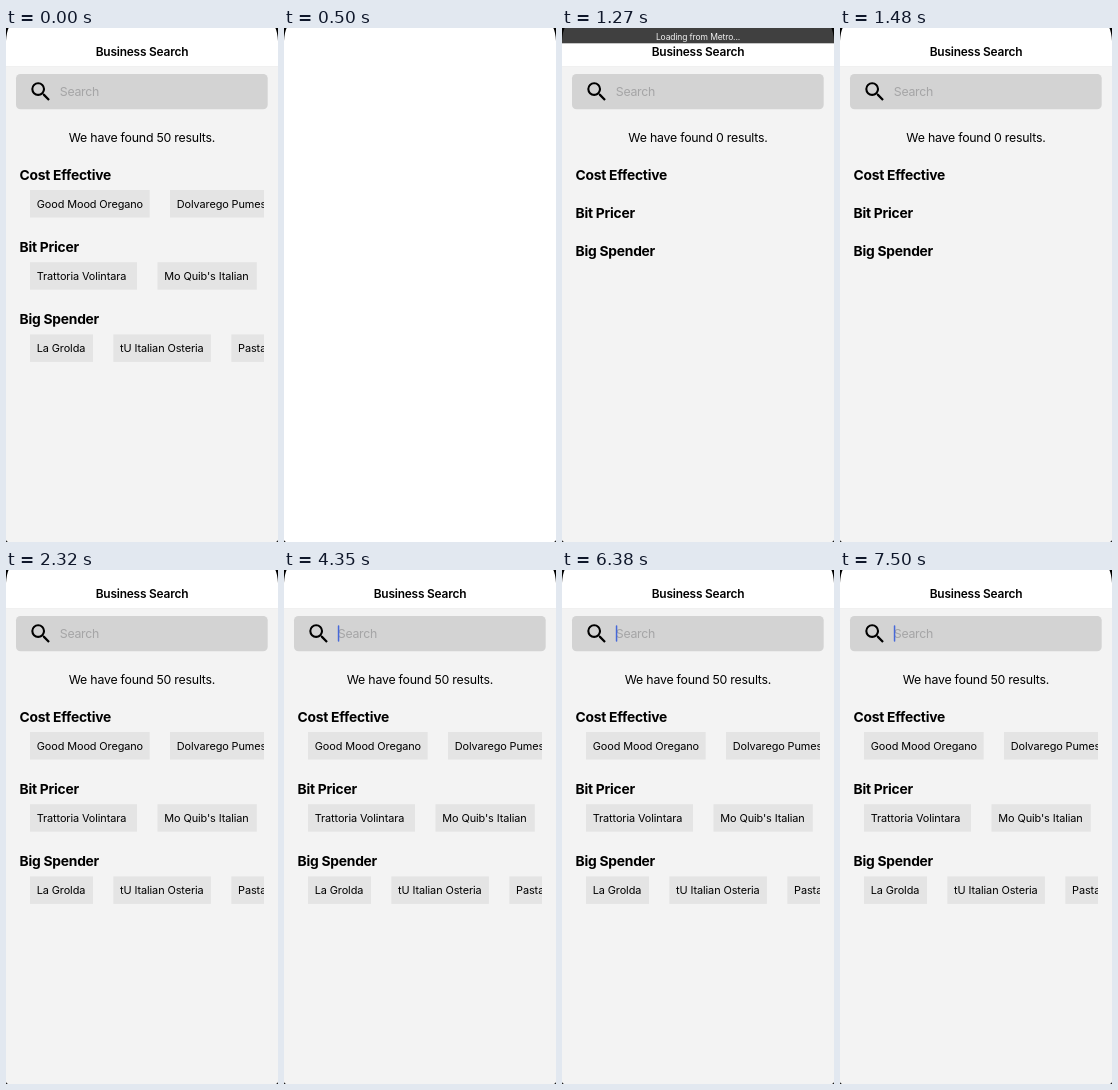
An HTML page that plays this animation: 272x514 px, repeating every 8 s.

```html
<!DOCTYPE html>
<html lang="en">
<head>
<meta charset="utf-8">
<title>Business Search</title>
<style>
  html, body { margin: 0; width: 100%; height: 100%; overflow: hidden; background: #000; }
  svg { display: block; width: 272px; height: 514px; }
  text { font: 400 12.33px Inter, "Open Sans", sans-serif; letter-spacing: -.22px; fill: #000; }
  .mid { text-anchor: middle; }
  .title { font-weight: 600; font-size: 11.9px; letter-spacing: -.2px; }
  .heading { font-weight: 700; font-size: 13.8px; letter-spacing: -.22px; }
  .chip { font-size: 10.9px; letter-spacing: -.1px; }
  .hint { letter-spacing: -.3px; fill: #a5a5a6; }
  .notice { font-size: 8.5px; letter-spacing: -.12px; fill: #f0f0f0; }
</style>
</head>
<body>
<svg viewBox="0 0 272 514">
  <defs>
    <clipPath id="rows"><rect x="13" y="100" width="245" height="260"/></clipPath>
  </defs>
  <rect width="272" height="514" fill="#fff"/>
  <g id="page">
    <rect y="39" width="272" height="475" fill="#f3f3f3"/>
    <rect y="38.6" width="272" height=".4" fill="#d8d8d8"/>
    <text class="mid title" x="136" y="27.9">Business Search</text>
    <rect x="10" y="46" width="251.7" height="35.2" rx="4.5" fill="#d3d3d3"/>
    <path transform="translate(22.1 51) scale(1.06)" d="M15.5 14h-.79l-.28-.27A6.47 6.47 0 0 0 16 9.5 6.5 6.5 0 1 0 9.5 16c1.61 0 3.09-.59 4.23-1.57l.27.28v.79l5 4.99L20.49 19l-4.99-5zm-6 0C7.01 14 5 11.99 5 9.5S7.01 5 9.5 5 14 7.01 14 9.5 11.99 14 9.5 14z"/>
    <text class="hint" x="53.8" y="68">Search</text>
    <rect id="caret" x="53.8" y="55.3" width="1.5" height="16.4" rx=".7" fill="#4668d9"/>
  </g>
  <g id="empty"></g>
  <g id="results" clip-path="url(#rows)"></g>
  <g id="banner">
    <rect width="272" height="15.3" fill="#404040"/>
    <text class="mid notice" x="136" y="11.6">Loading from Metro...</text>
  </g>
  <path d="M0 0H2.6Q.6 4 0 13ZM272 0H269.4Q271.4 4 272 13ZM0 514V512Q.4 513.6 2 514ZM272 514V512Q271.6 513.6 270 514Z"/>
</svg>
<script>
const LOOP = 8000;
const $ = id => document.getElementById(id);

function add(parent, tag, attrs, text = '') {
  const el = document.createElementNS('http://www.w3.org/2000/svg', tag);
  for (const key in attrs) el.setAttribute(key, attrs[key]);
  el.textContent = text;
  parent.append(el);
}

// Each chip: left edge, width, label.
const sections = [
  ['Cost Effective', [[24, 119.7, 'Good Mood Oregano'], [164, 124, 'Dolvarego Pumessi']]],
  ['Bit Pricer', [[24, 107, 'Trattoria Volintara'], [151.5, 99.3, "Mo Quib's Italian"]]],
  ['Big Spender', [[24, 63, 'La Grolda'], [107.3, 97.6, 'tU Italian Osteria'], [225.3, 70, 'Pasta']]],
];

function drawList(group, count, pitch, withChips) {
  add(group, 'text', { class: 'mid', x: 136, y: 114 }, `We have found ${count} results.`);
  sections.forEach(([name, chips], i) => {
    const y = 152 + i * pitch;
    add(group, 'text', { class: 'heading', x: 13.5, y }, name);
    if (!withChips) return;
    for (const [x, width, label] of chips) {
      add(group, 'rect', { x, y: y + 10, width, height: 27.5, fill: '#e4e4e4' });
      add(group, 'text', { class: 'chip', x: x + 6.8, y: y + 27.8 }, label);
    }
  });
}

drawList($('empty'), 0, 37.8, false);
drawList($('results'), 50, 72.2, true);

// Hold each opacity from its time (ms) until the next step.
function play(id, steps) {
  const frames = [...steps, [LOOP, steps.at(-1)[1]]].map(([time, opacity]) =>
    ({ offset: time / LOOP, opacity, easing: 'step-end' }));
  $(id).animate(frames, { duration: LOOP, iterations: Infinity });
}

play('page', [[0, 1], [500, 0], [1270, 1]]);
play('empty', [[0, 0], [1270, 1], [2320, 0]]);
play('results', [[0, 1], [500, 0], [2320, 1]]);
play('banner', [[0, 0], [780, 1], [1340, .7], [1410, .3], [1480, 0]]);
play('caret', [
  [0, 0], [4350, 1],
  [4910, .5], [4980, 0], [5260, .5], [5330, 1],
  [5960, .5], [6030, 0], [6310, .5], [6380, 1],
  [7010, .5], [7080, 0], [7360, .3], [7430, .7], [7500, 1],
]);
</script>
</body>
</html>
```
